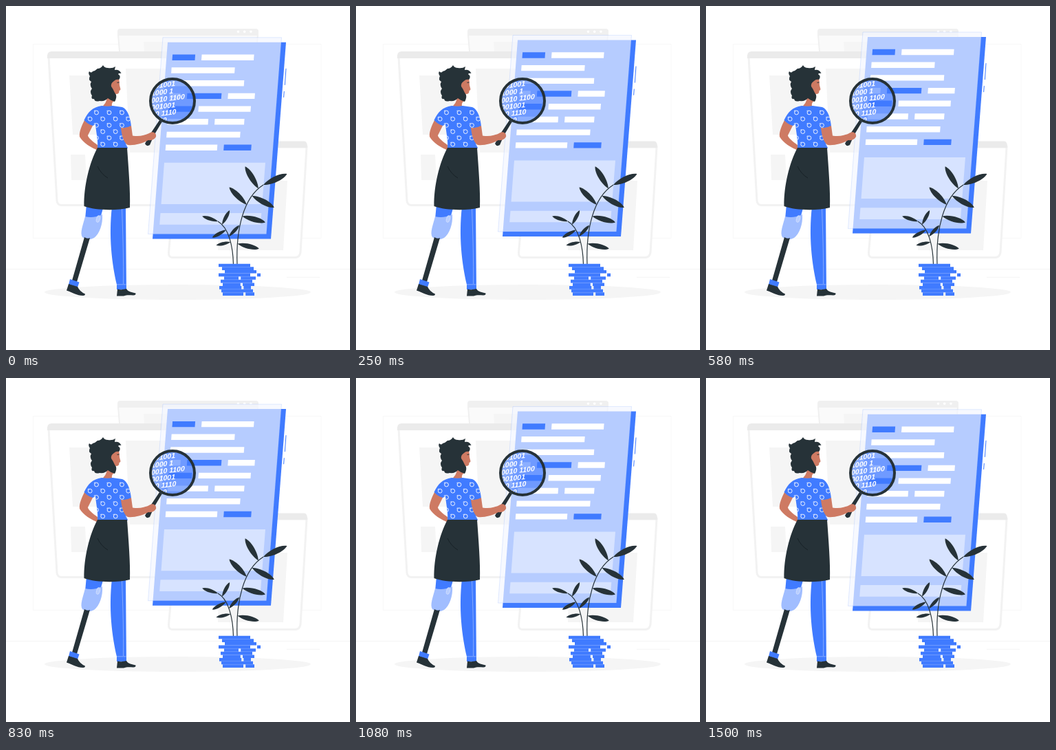
An HTML page for the animation above (1540 ms loop, 500 px wide and 500 px high).

```html
<!DOCTYPE html>
<html lang="en">
<head>
<meta charset="utf-8">
<title>Code review</title>
<style>
  html, body { margin: 0; width: 100%; height: 100%; overflow: hidden; background: #fff; }
  svg { display: block; width: 100vw; height: 100vh; }
  .blue { fill: #407bff; }
  .dark { fill: #263238; }
  .skin { fill: #ce7a63; }
  .head { fill: #ebebeb; }
  .block { fill: #f5f5f5; }
  .frame { fill: #fff; stroke: #f2f2f2; stroke-width: 3; }
  .hairline { fill: none; stroke: #ebebeb; stroke-width: .6; }
  .stem { fill: none; stroke: #263238; stroke-width: 1.2; }
  #digits { fill: #fff; font: italic bold 10.5px "Liberation Sans", Arial, sans-serif; white-space: pre; }
</style>
</head>
<body>
<svg viewBox="0 0 500 500">
  <defs>
    <clipPath id="glass"><circle cx="242" cy="138" r="31"/></clipPath>
    <clipPath id="top"><use href="#shirt"/></clipPath>
  </defs>

  <!-- room -->
  <path class="hairline" d="M0 382.4H500M408 394.3H456"/>
  <path class="hairline" stroke-opacity=".6" d="M39.5 55.5H458V337.5H39.5Z"/>
  <ellipse class="block" cx="249.5" cy="416" rx="193.5" ry="11"/>

  <!-- windows behind -->
  <path fill="#fafafa" stroke="#f0f0f0" stroke-width="2" d="M163 42H366L350 220H178Z"/>
  <path fill="#f0f0f0" d="M162 41V37Q162 33 166 33H363Q367 33 367 37V41Z"/>
  <path class="block" d="M200 52H240V66H201Z"/>
  <path stroke="#fff" stroke-width="3.6" stroke-linecap="round" stroke-dasharray="0 9.2" d="M337.5 37.2H357"/>

  <path class="frame" d="M62 74H244V289.5H81Q74.5 289.5 74 283Z"/>
  <path class="head" d="M60 76Q59 66 66 66H240V76Z"/>
  <path class="block" d="M92 101H150L155 187H97ZM174 91H240V213H180ZM94 216H115L117 253H95Z"/>

  <path class="frame" d="M250 205H437L428 358Q427 365.500 420 365.500H242Q236 365.500 236.500 358Z"/>
  <path class="head" d="M250 206V196.500H433Q438.500 196.500 438 206Z"/>
  <path class="block" d="M310 254H409L403 355H308Z"/>

  <!-- floating page -->
  <g id="page">
    <path class="blue" d="M235 53.400H407L385 339H213Z"/>
    <path fill="#f3f6ff" fill-opacity=".66" stroke="#407bff" stroke-opacity=".3" stroke-width=".5" d="M228 46.400H400.500L378.500 332H206.500Z"/>
    <path fill="#fff" fill-opacity=".45" d="M230 228.400H377L372.300 288.500H225.500ZM224.500 301.600H371.300L370 318.300H223.200Z"/>
    <path fill="none" stroke="#407bff" d="M407 91.500L405.300 115.500M404.300 124.500L403.600 133.500"/>
    <g id="lines"></g>
  </g>

  <!-- woman: legs -->
  <path class="blue" d="M154 292C149 335 154 375 161 405V412H175L174 292ZM117 288L142 291L137 308L115 310Z"/>
  <path fill="none" stroke="#a0bdff" stroke-width=".7" d="M168.500 295C170 335 171 370 170.500 404M161 404.800H174.500"/>
  <path fill="#a0bdff" d="M115 306Q127 309 140 303C141 317 136 331 128 337Q119 342 111 336C107 330 112 318 115 306Z"/>
  <ellipse cx="134" cy="309.500" rx="2.500" ry="5" transform="rotate(15 134 309.500)" fill="#b8ceff" stroke="#d6e2ff" stroke-width=".7"/>
  <path class="dark" d="M114 336Q118 339 122 337L103 401L96 399Z"/>
  <path class="blue" d="M93 397L106.500 401.500L104 409L91 405Z"/>
  <path class="dark" d="M91 404L104 408Q107 415 115 418.500Q115 421 112 421C103 421 96 416 88 413.500ZM162 411.500Q168 413 175 411C178 416 183 416 188.500 417.500Q189 420.500 185 420.500C178 420 175 420 171 421.500H161Z"/>

  <!-- woman: body -->
  <path class="skin" d="M115 164C110 174 106 183 107 190C112 199 124 206 134 210L133 202C126 197 119 191 119 188L127 172Z"/>
  <path class="skin" d="M147 132L158 138Q153 139 154 146L138 147Q146 143 147 132Z"/>
  <path id="shirt" class="blue" d="M139 145Q148 146.500 155 145L169 147C177 150 181 163 182 175Q176 178 168 177L177 207H133C134 195 131 184 130 172L126 174Q119 172 113.500 166C119 154 126 147 139 145Z"/>
  <g id="rings" clip-path="url(#top)" fill="none" stroke="#fff" stroke-width=".9"></g>
  <path class="dark" d="M133 206H176C178 235 181 270 180 293C160 298 130 297 113.500 291C113 262 121 228 133 206Z"/>
  <path fill="none" stroke="#172126" d="M133 233Q138 244 148 250"/>

  <!-- woman: head -->
  <path class="skin" d="M150 104H164Q165 111 165 115L166.500 121Q166 123 164.500 123Q165 128 160 128L150 125Z"/>
  <path class="dark" d="M141 86Q143 90 148 90Q155 91 159 88Q158 92 158 93Q165 92 167.500 98Q164 97 163 99Q168 102 164 107Q160 106 157 109Q152 112 153 117Q156 121 158 126L160 129Q161 134 158 139Q153 138 148 134Q144 139 136 138Q129 140 128 135Q123 136 125 130Q121 125 125 120Q121 115 124 110Q119 107 122 102Q119 98 121 95Q124 98 126 95Q130 94 133 91Q138 91 141 86Z"/>
  <path class="dark" d="M161.500 111L164.500 110.500V111.500L161.500 112Z"/>

  <!-- magnifier -->
  <circle class="blue" cx="242" cy="138" r="32" fill-opacity=".6"/>
  <g clip-path="url(#glass)"><g id="digits" transform="translate(211 120.300) skewY(-6.800)"></g></g>
  <circle cx="242" cy="138" r="32" fill="none" stroke="#263238" stroke-width="4"/>
  <path class="dark" d="M223 166L227 168L215 188L209 202Q204 205 202 200L211 184Z"/>
  <path class="skin" d="M167 177Q175 178 182 174L184 188.500C194 190 202 188 208 185C214 181 219 185 218 190Q215 196 207 195C198 200 186 203 177 202C171 199 168 187 167 177Z"/>

  <!-- plant -->
  <path id="tall" class="stem" d="M336 376C334 325 345 278 374 260"/>
  <path id="short" class="stem" d="M330.500 376C330 350 324 322 308 313"/>
  <g id="leaves" class="dark"></g>
  <g id="pot" class="blue"></g>
</svg>
<script>
const $ = id => document.getElementById(id);
const repeat = (n, draw) => Array.from({ length: n }, (_, i) => draw(i)).join('');

// Widths of the pieces in each row of page text; negative ones are blue
const rows = [[-33, 76], [92], [107], [16, -50, 39], [-34, 76], [59, 43], [107], [75, -40]];
$('lines').innerHTML = rows.map((row, i) => {
  let x = 241.8 - 1.4 * i;
  return row.map(w => {
    const width = Math.abs(w);
    const bar = `<path fill="${w < 0 ? '#407bff' : '#fff'}" d="M${x + .3} ${71.2 + 18.7 * i}h${width}l-.6 8.4h${-width}Z"/>`;
    x += width + 9.5;
    return bar;
  }).join('');
}).join('');

const digits = ['    001001', '   1000      1', '   0010 1100', '001001', '  00       1110', '        1100'];
$('digits').innerHTML = digits.map((s, i) => `<text y="${10.3 * i}">${s}</text>`).join('');

// Staggered lattice of rings
$('rings').innerHTML = repeat(6, r => repeat(5, k => {
  const x = 113 + 18.5 * k + 9.2 * (r % 2), y = 155 + 9.2 * r;
  return `<circle cx="${x}" cy="${y}" r="2.9"/><path d="M${x - 3.5} ${y - 2}l1.5-1.5"/>`;
}));

// Leaves as [place along the stem, direction in degrees]
function sprig(stem, size, leaves) {
  const total = stem.getTotalLength();
  return leaves.map(([place, angle]) => {
    const p = stem.getPointAtLength(place * total);
    const len = size * (.8 + .2 * place), w = len * .15;
    return `<path transform="translate(${p.x} ${p.y}) rotate(${angle})"
      d="M0 0C${len * .3} ${w} ${len * .8} ${w} ${len} 0C${len * .8} ${-w} ${len * .3} ${-w} 0 0"/>`;
  }).join('');
}
$('leaves').innerHTML =
  sprig($('tall'), 38, [[.24, 13], [.56, 15], [.7, 225], [.82, 28], [.93, 239], [1, -25]]) +
  sprig($('short'), 24, [[.48, 167], [.6, -47], [.75, 151], [.89, -62], [1, 198]]);

// Stacked strips; some lower ones are split
const offsets = [0, 5, 9, 0, 8, 3, 6, 1, 4, 6];
$('pot').innerHTML = offsets.map((offset, i) => {
  const y = 374.7 + 4.63 * i, left = 309 + offset, right = left + 46;
  const split = i > 3 && i % 3 !== 2 ? `H${332.4 + 1.4 * i}v4.6H${left}ZM${335.6 + 1.4 * i} ${y}` : '';
  return `<path d="M${left} ${y}${split}H${right}v4.6H${split ? 335.6 + 1.4 * i : left}Z"/>`;
}).join('') + '<path d="M365 388.6h5v4.6h-5Z"/>';

const LOOP = 1540, STEP = 1000 / 24, FLOAT = 1500, LEAD = 45, RISE = 10;

function render(now) {
  const t = Math.floor((now % LOOP + 3.5) / STEP) * STEP;
  const phase = (t + LEAD) % FLOAT / FLOAT;
  const lift = RISE * (1 - Math.abs(1 - 2 * phase));
  $('page').setAttribute('transform', `translate(0 ${-lift})`);
}

const start = performance.now();
(function tick() {
  render(performance.now() - start);
  requestAnimationFrame(tick);
})();
</script>
</body>
</html>
```
